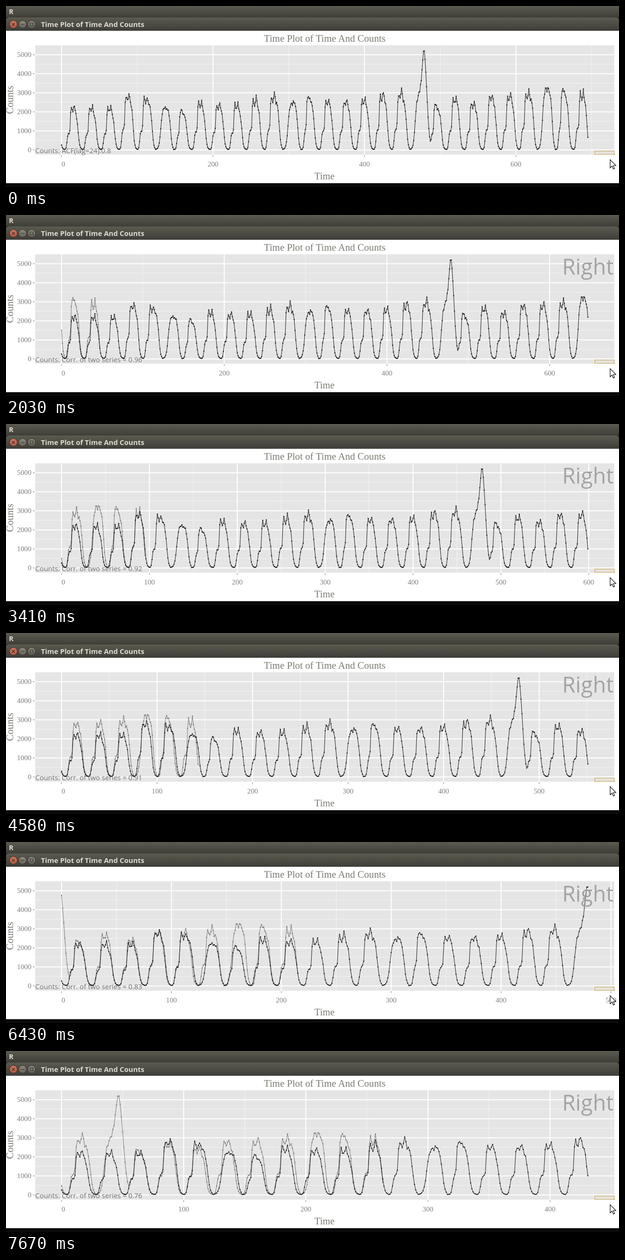
Animation of 1280x380 px, one loop 8 s. Source, as an HTML page:

```html
<!DOCTYPE html>
<html lang="en">
<head>
<meta charset="utf-8">
<title>Time Plot</title>
<style>
html, body { margin: 0; width: 100%; height: 100%; overflow: hidden; background: #fff; }
svg { display: block; width: 1280px; height: 380px; }
.sans { font-family: "Open Sans", "Noto Sans", sans-serif; }
.serif { font-family: "Liberation Serif", serif; fill: #7c7a72; }
.tick { font-size: 15px; fill: #7f7f7f; }
.bold { font-weight: 700; fill: #dfdbd2; }
.major { stroke: #fff; stroke-width: 2; }
.minor { stroke: #f2f2f2; stroke-width: 1.2; }
.mark { stroke: #7f7f7f; stroke-width: 1; }
.line { fill: none; stroke-width: 1; stroke-linejoin: round; }
.dots { fill: none; stroke-width: 2.5; stroke-linecap: round; }
</style>
</head>
<body>
<svg viewBox="0 0 1280 380">
  <defs>
    <linearGradient id="bar" x2="0" y2="1">
      <stop offset="0" stop-color="#5c5b50"/><stop offset="1" stop-color="#3e3d38"/>
    </linearGradient>
    <linearGradient id="red" x2="0" y2="1">
      <stop offset="0" stop-color="#d9775b"/><stop offset="1" stop-color="#b9573e"/>
    </linearGradient>
    <linearGradient id="grey" x2="0" y2="1">
      <stop offset="0" stop-color="#8d8b80"/><stop offset="1" stop-color="#66645b"/>
    </linearGradient>
    <clipPath id="panel"><rect x="61" y="82.5" width="1209" height="229.5"/></clipPath>
  </defs>
  <rect width="1280" height="380" fill="#fff"/>
  <rect width="1280" height="40" fill="#1c1b19"/>
  <rect width="1280" height="24" fill="url(#bar)"/>
  <path d="M0 52V30q0-6 6-6H1274q6 0 6 6V52z" fill="url(#bar)"/>
  <rect y="372" width="1280" height="8" fill="#0a0a0d"/>
  <g stroke="#33322d">
    <circle cx="15.5" cy="38.5" r="8" fill="url(#red)"/>
    <circle cx="34.5" cy="38.5" r="8" fill="url(#grey)"/>
    <circle cx="53.5" cy="38.5" r="8" fill="url(#grey)"/>
    <path d="M12.5 35.5l6 6m0-6l-6 6M30.5 38.5h8M50.5 35.5h6v6h-6z" fill="none" stroke-width="1.2"/>
  </g>
  <text class="sans bold" x="6" y="17" font-size="14.5">R</text>
  <text class="sans bold" x="73" y="44" font-size="14.7">Time Plot of Time And Counts</text>
  <text class="serif" x="665.5" y="75" font-size="20.6" text-anchor="middle">Time Plot of Time And Counts</text>
  <text class="serif" x="665" y="364" font-size="20.2" text-anchor="middle">Time</text>
  <text class="serif" transform="translate(14.5 197) rotate(-90)" font-size="21" text-anchor="middle">Counts</text>
  <rect x="61" y="82.5" width="1209" height="229.5" fill="#e5e5e5"/>
  <g id="plot"></g>
  <rect x="1229.5" y="304.5" width="40.5" height="7" fill="#e5e3dc" stroke="#c3a150"/>
  <path d="M1270.5 310v3" stroke="#c3a150"/>
  <path d="M1261.5 322.5v17.2l4-3.7 2.7 6.2 2.6-1.1-2.7-6.1h5.4z" fill="#fff" stroke="#000" stroke-width="1.1"/>
</svg>
<script>
// Highest count of each day, in tens; the first day is a Monday
const peaks = [233, 225, 225, 295, 280, 222, 208, 263, 250, 247, 273, 289, 245, 290, 266, 266,
  273, 299, 305, 288, 240, 280, 254, 291, 294, 315, 320, 324, 310];
// Hour at which the evening traffic has halved, Monday to Sunday
const bedtime = [21.8, 22, 22, 22.4, 23.5, 23.8, 21.8];

const sigmoid = x => 1 / (1 + Math.exp(-x));
const bump = x => Math.exp(-x * x / 2);
const jitter = i => {
  const s = Math.sin(i * 12.9898 + 4.1) * 43758.5453;
  return 2 * (s - Math.floor(s)) - 1;
};

// Share of the day's peak at hour h, where 4 <= h < 28
function shape(h, weekday) {
  const fall = sigmoid((bedtime[weekday] - h) / 1.1);
  if (weekday === 5) return fall * sigmoid((h - 11) / 1.2);
  const sunday = weekday === 6;
  const early = .36 * sigmoid((h - (sunday ? 8.2 : 7.2)) * 1.8);
  const late = .5 * sigmoid((h - 11.5) * 3.5);
  const rush = sunday ? .12 * bump((h - 14) / 1.5)
    : .1 * bump((h - 13) / .8) + .15 * bump((h - 17) / .8);
  return (early + late) * fall + rush;
}

function count(i) {
  const day = Math.floor((i - 4) / 24);
  const level = 10 * peaks[Math.max(day, 0)] * shape(i - day * 24, (day + 7) % 7);
  const surge = 3450 * bump((i - 480.2) / 3.18);
  return 25 + level * (1 + .05 * jitter(i)) + surge;
}
const series = Array.from({ length: peaks.length * 24 }, (_, i) => count(i));

// start ms, days shifted, correlation, key label shown
const steps = [
  [0, 0, 0, 0], [970, 1, .97, 1], [2030, 2, .96, 1], [2580, 2, .96, 0], [2750, 3, .93, 1],
  [3410, 4, .92, 1], [3970, 5, .91, 1], [4580, 6, .91, 1], [4620, 6, .91, 0], [5190, 7, .95, 1],
  [5810, 8, .95, 1], [6430, 9, .83, 1], [6550, 9, .83, 0], [7010, 10, .78, 1], [7670, 11, .76, 1]
];

const plot = document.getElementById("plot");
const yOf = v => 302.2 - v * .04;
const seg = (cls, x1, y1, x2, y2) =>
  `<line class="${cls}" x1="${x1}" y1="${y1}" x2="${x2}" y2="${y2}"/>`;
const label = (cls, x, y, anchor, text, more = "") =>
  `<text class="${cls}" x="${x}" y="${y}" text-anchor="${anchor}" ${more}>${text}</text>`;

function curve(values, unit, color) {
  const pts = values.map((v, i) => (116 + i * unit).toFixed(2) + " " + yOf(v).toFixed(2));
  return `<g stroke="${color}"><path class="line" d="M${pts.join("L")}"/>` +
    `<path class="dots" d="${pts.map(p => `M${p}h.01`).join("")}"/></g>`;
}

function draw([, shift, corr, key]) {
  const size = series.length - 24 * shift;
  const unit = 1099 / (size - 1);
  const step = 1209 / unit > 700 ? 200 : 100;
  let minor = "", major = "", axis = "";
  for (let v = 500; v < 5500; v += 1000) minor += seg("minor", 61, yOf(v), 1270, yOf(v));
  for (let v = 0; v <= 5000; v += 1000) {
    const y = yOf(v);
    major += seg("major", 61, y, 1270, y);
    axis += seg("mark", 56, y, 60, y) + label("serif tick", 53, y + 4.8, "end", v);
  }
  for (let t = 0; 116 + t * unit < 1270; t += step / 2) {
    const x = 116 + t * unit;
    if (t % step) {
      minor += seg("minor", x, 83, x, 312);
    } else {
      major += seg("major", x, 83, x, 312);
      axis += seg("mark", x, 313, x, 317) + label("serif tick", t ? x : 119.7, 337, "middle", t);
    }
  }
  const note = shift ? "Corr. of two series = " + corr.toFixed(2) : "ACF(lag=24):0.8";
  plot.innerHTML = `<g clip-path="url(#panel)">${minor}${major}</g>${axis}` +
    (shift ? curve(series.slice(size), unit, "#777") : "") +
    curve(series.slice(0, size), unit, "#1a1a1a") +
    label("sans", 61, 309, "start", "Counts: " + note, 'font-size="14.5" fill="#666" fill-opacity=".9"') +
    (key ? label("sans", 1269, 124.5, "end", "Right", 'font-size="45.2" fill="#a3a3a3"') : "");
}

let shown = null;
const origin = performance.now();
function tick() {
  const t = Math.max(0, performance.now() - origin) % 8000;
  const now = steps.filter(s => s[0] <= t).pop();
  if (now !== shown) draw(shown = now);
  requestAnimationFrame(tick);
}
tick();
</script>
</body>
</html>
```
